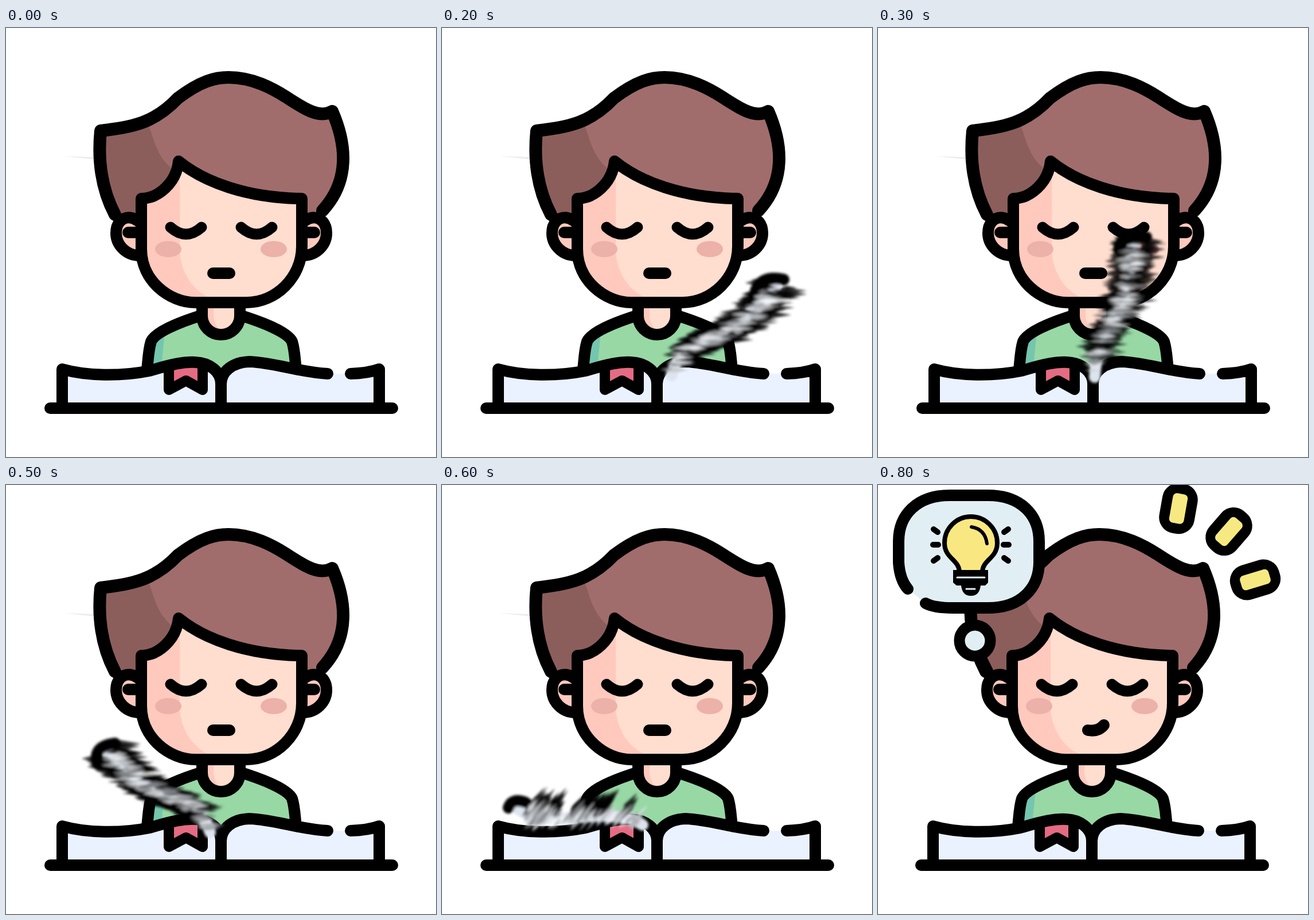
An HTML page that plays this animation: 750 px wide and 747 px high, repeating every 900 ms.

```html
<!DOCTYPE html>
<html lang="en">
<head>
<meta charset="utf-8">
<title>Reading and getting an idea</title>
<style>
  html, body { margin: 0; width: 100%; height: 100%; overflow: hidden; background: #fff; }
  svg { display: block; width: 100%; height: 100%; }
  .line { fill: none; stroke: #000; stroke-width: 20; stroke-linecap: round; stroke-linejoin: round; }
  .hidden { display: none; }
</style>
</head>
<body>
<svg viewBox="0 0 750 747" xmlns="http://www.w3.org/2000/svg">
  <defs>
    <filter id="soft" x="-20%" y="-20%" width="140%" height="140%"><feGaussianBlur stdDeviation="2"/></filter>
    <clipPath id="sparkClip"><rect width="704" height="747"/></clipPath>
    <path id="hairShape" d="M165 179C222 172 258 166 300 122C340 92 365 86 388 86C430 86 465 105 490 121C525 144 548 157 569 145C593 200 601 265 552 318L535 328H515V297C420 296 345 268 301 232C297 270 265 297 236 297V325H190C170 287 159 240 165 179Z"/>
    <path id="faceShape" d="M236 297C265 297 297 270 301 232C345 268 420 296 516 297V380C516 435 470 478 420 478H330C285 478 236 440 236 385Z"/>
    <path id="shirtShape" d="M342 500C300 513 260 530 253 546C248 562 248 580 246 598H506C504 580 504 562 499 546C492 530 450 513 408 500Z"/>
    <clipPath id="hairClip"><use href="#hairShape"/></clipPath>
    <clipPath id="faceClip"><use href="#faceShape"/></clipPath>
    <clipPath id="shirtClip"><use href="#shirtShape"/></clipPath>
    <g id="ear">
      <path d="M236 396C210 396 192 378 192 357C192 341 201 330 215 330H236Z" fill="#ffc9bd"/>
      <path class="line" d="M232 396C210 396 192 378 192 357C192 341 201 330 215 330Q224 331 230 336"/>
      <path class="line" d="M213 356H234"/>
    </g>
    <g id="spark">
      <rect x="-21" y="-34" width="42" height="68" rx="18" class="line" style="fill:#000"/>
      <rect x="-13" y="-26" width="26" height="52" rx="7" fill="#f7e981"/>
    </g>
    <path id="glass" d="M142 152C142 130 116 128 116 101A46 46 0 0 1 208 101C208 128 182 130 182 152Z"/>
  </defs>

  <rect width="750" height="747" fill="#fff"/>
  <path id="wisp" d="M100 223L156 225V229Z" fill="#ececec"/>

  <g id="sparks"><g clip-path="url(#sparkClip)">
    <use href="#spark" transform="translate(524 41) rotate(10)"/>
    <use href="#spark" transform="translate(612 81) rotate(41)"/>
    <use href="#spark" transform="translate(658 165) rotate(73)"/>
  </g></g>

  <g id="reader">
    <use href="#hairShape" fill="#a06d6c"/>
    <path clip-path="url(#hairClip)" d="M150 165H247C258 190 260 222 292 247L230 330H150Z" fill="#8b5e5c"/>
    <use href="#ear"/>
    <use href="#ear" transform="translate(751 0) scale(-1 1)"/>
    <path class="line" style="stroke-width:22" d="M190 325C170 287 159 240 165 179C222 172 258 166 300 122C340 92 365 86 388 86C430 86 465 105 490 121C525 144 548 157 569 145C593 200 601 265 552 318"/>

    <use href="#shirtShape" fill="#98d8a5"/>
    <path clip-path="url(#shirtClip)" d="M240 530H277L270 600H240Z" fill="#75c6af"/>
    <path class="line" d="M342 500C300 513 260 530 253 546C248 562 248 580 246 594M408 500C450 513 492 530 499 546C504 562 504 580 506 594"/>
    <path d="M342 478V501A33 33 0 0 0 408 501V478Z" fill="#ffddcf"/>
    <path d="M342 478H362V501Q363 518 375 528Q346 525 342 501Z" fill="#ffc9bd"/>
    <path class="line" d="M342 484V501A33 33 0 0 0 408 501V484"/>

    <use href="#faceShape" fill="#ffddcf"/>
    <path clip-path="url(#faceClip)" d="M230 230H303V390C305 425 325 458 358 471V485H230Z" fill="#ffc9bd"/>
    <use href="#faceShape" class="line"/>
    <ellipse cx="283" cy="385" rx="23" ry="14" fill="#ecb1a9"/>
    <ellipse cx="467" cy="385" rx="23" ry="14" fill="#ecb1a9"/>
    <path class="line" style="stroke-width:19" d="M287 347Q314 371 341 347M410 347Q437 371 464 347"/>
    <path id="mouth" class="line"/>

    <path d="M98 655V594C140 606 200 607 250 597C290 585 310 581 330 582C355 583 375 598 375 620C375 598 395 582 425 581C470 583 510 599 561 602H601Q632 601 651 594V655Z" fill="#ebf2ff"/>
    <path d="M284 592L334 584L343 590V628L314 613L284 628Z" fill="#e56b82"/>
    <path class="line" style="stroke-width:18" d="M284 594V630L314 614L343 630V592"/>
    <path d="M352 593Q365 605 366 632V610Q363 597 354 592Z" fill="#fff"/>
    <path class="line" d="M98 655V594C140 606 200 607 250 597C290 585 310 581 330 582C355 583 375 598 375 620V655M375 620C375 598 395 582 425 581C470 583 510 599 561 602M601 602Q632 601 651 594V655M77 662H674"/>
  </g>

  <g id="pages" filter="url(#soft)"></g>

  <g id="thought">
    <path class="line" style="stroke-width:18" d="M160 222L163 240M180 300L192 324"/>
    <circle cx="169" cy="271" r="27" class="line" style="fill:#e1eff5;stroke-width:19"/>
    <path class="line" style="fill:#e1eff5" d="M83 206Q98 214 130 214H192C249 214 281 180 281 134V98C281 52 249 18 192 18H125C68 18 36 52 36 98V135Q38 165 52 181"/>
    <use id="bulb" href="#glass" class="line"/>
    <path id="shine" class="line" d="M163 73Q187 77 190 102"/>
    <path d="M131 148H192V170L187 175H179Q177 193 162 193Q147 193 145 175H137L131 170Z"/>
    <path class="line" style="stroke:#e1eff5;stroke-width:3" d="M138 161H186M154 181H169"/>
    <path id="rays" class="line" style="stroke-width:10" d="M97 77L104 82M96 104H105M97 132L104 127M227 77L220 82M228 104H219M227 132L220 127"/>
  </g>
</svg>
<script>
const NS = 'http://www.w3.org/2000/svg';
const STEP = 100, STEPS = 9;
const $ = id => document.getElementById(id);

// Turning page: spine from the book's fold to the tip, dark hook at the tip, smear angle.
const turns = [
  { spine: 'M392 602C440 555 540 580 646 540', hook: 'M622 526Q650 518 658 548', angle: -40 },
  { spine: 'M400 605C418 540 470 552 520 512C555 488 572 470 582 442', hook: 'M545 466Q552 428 596 438', angle: 0 },
  { spine: 'M378 608C380 550 408 520 424 480C440 440 440 410 448 365', hook: 'M420 385Q425 356 468 364', angle: 0 },
  { spine: 'M359 612C366 560 350 530 332 495C308 450 300 430 296 392', hook: 'M274 414Q274 382 314 385', angle: 0 },
  { spine: 'M356 605C340 550 280 552 245 522C205 498 190 485 176 460', hook: 'M160 486Q150 455 190 450', angle: 0 },
  { spine: 'M350 592C310 562 220 586 180 580C150 575 138 570 128 560', hook: 'M116 562Q122 544 146 553', angle: -52 }
];

function make(parent, d, style) {
  const path = document.createElementNS(NS, 'path');
  path.setAttribute('d', d);
  path.setAttribute('class', 'line');
  Object.assign(path.style, style);
  return parent.appendChild(path);
}

function seeded(seed) {
  return () => (seed = seed * 16807 % 2147483647) / 2147483647;
}

function buildPage({ spine, hook, angle }, index) {
  const group = document.createElementNS(NS, 'g');
  $('pages').appendChild(group);
  const random = seeded(971 + index * 53);
  const flat = angle < -45;
  const base = make(group, spine, { stroke: '#dde4ee', strokeWidth: 20 });
  const length = base.getTotalLength();
  const dx = Math.cos(angle * Math.PI / 180), dy = Math.sin(angle * Math.PI / 180);

  // A thin tapered smear, offset sideways from the spine.
  function streak(t, side, reach, color, width, opacity) {
    const p = base.getPointAtLength(t * length);
    const q = base.getPointAtLength(Math.max(0, t * length - 4));
    const run = Math.hypot(p.x - q.x, p.y - q.y) || 1;
    const x = p.x + side * (q.y - p.y) / run, y = p.y + side * (p.x - q.x) / run;
    const [ax, ay, wx, wy] = [dx * reach, dy * reach, -dy * width, dx * width];
    make(group, `M${x - ax} ${y - ay}L${x + wx} ${y + wy}L${x + ax * 1.4} ${y + ay * 1.4}L${x - wx} ${y - wy}Z`,
      { fill: color, stroke: 'none', opacity });
  }

  for (let i = 0; i < 90; i++) {
    const t = 0.14 + 0.86 * i / 90;
    const half = flat ? 18 : 9 + 13 * t;
    const side = flat || i % 2 ? half : -half;
    const gap = flat && Math.sin(t * 17 + 1) < -0.5;
    const spread = 0.7 + random() * 0.5, reach = 12 + random() * 18, width = 3 + random() * 4;
    if (!gap) streak(t, side * spread, reach, '#000', width, 0.8);
  }
  make(group, hook, { strokeWidth: 20 });
  for (let i = 0; i < 75; i++) {
    const t = 0.03 + 0.9 * random();
    const shade = 110 + Math.floor(random() * 145);
    streak(t, (random() - 0.5) * (12 + 16 * t), 8 + random() * 14,
      `rgb(${shade},${shade + 3},${shade + 7})`, 2 + random() * 3, 0.75);
  }
  return group;
}

const pages = turns.map(buildPage);
const show = (node, on) => node.classList.toggle('hidden', !on);
let current = -1;

function draw(step) {
  const idea = step >= 7, bright = step === 8;
  pages.forEach((page, i) => show(page, step === i + 1));
  show($('wisp'), !idea);
  show($('sparks'), idea);
  show($('thought'), idea);
  show($('rays'), bright);
  $('sparks').setAttribute('transform', bright ? '' : 'translate(-38 39)');
  $('reader').setAttribute('transform', idea ? 'translate(-2 0)' : '');
  $('mouth').setAttribute('d', bright ? 'M368 427Q386 430 396 418' : 'M361 427H390');
  $('bulb').style.fill = bright ? '#f9e881' : 'none';
  $('bulb').style.strokeWidth = bright ? 8 : 10;
  $('shine').style.strokeWidth = bright ? 6 : 10;
}

function tick() {
  const step = Math.floor(performance.now() / STEP) % STEPS;
  if (step !== current) draw(current = step);
  requestAnimationFrame(tick);
}
tick();
</script>
</body>
</html>
```
